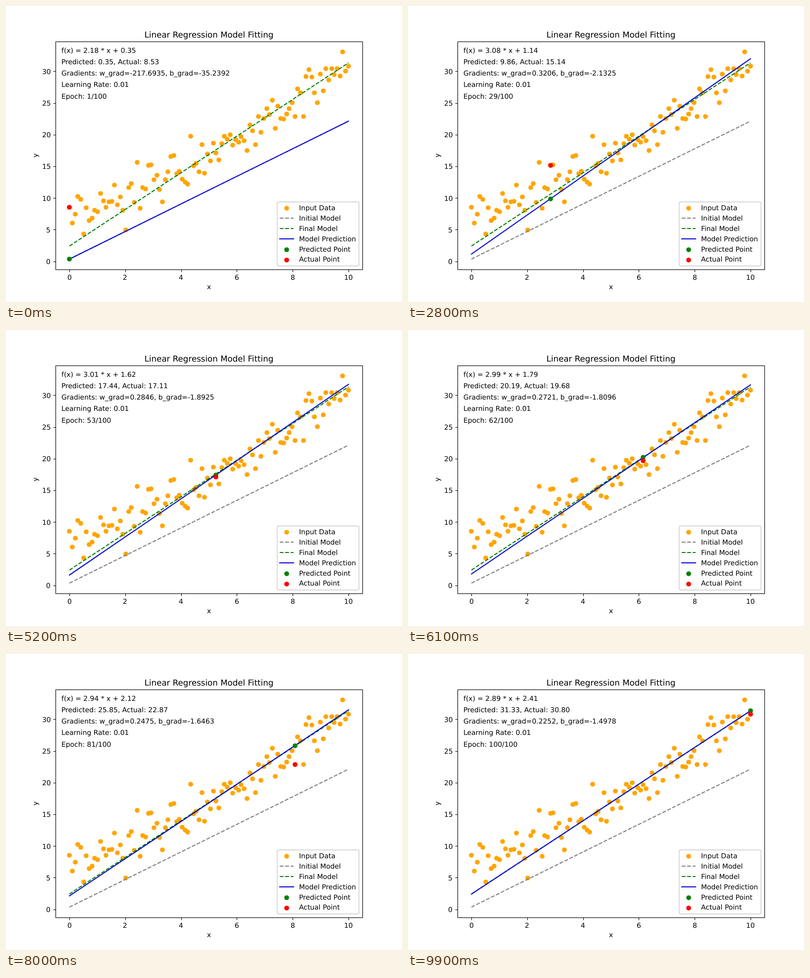
These frames come from a looping animation (800 px wide and 600 px high, 10000 ms). An HTML page:

```html
<!DOCTYPE html>
<html lang="en">
<head>
<meta charset="utf-8">
<title>Linear Regression Model Fitting</title>
<style>
  html, body { margin: 0; width: 100%; height: 100%; overflow: hidden; background: #fff; }
  svg { display: block; width: 800px; height: 600px; }
  text { font: 13.89px "DejaVu Sans", sans-serif; text-rendering: geometricPrecision; white-space: pre; }
  .title { font-size: 16.67px; }
  .mid { text-anchor: middle; }
</style>
</head>
<body>
<svg id="stage" viewBox="0 0 800 600" xmlns="http://www.w3.org/2000/svg"></svg>
<script>
const EPOCHS = 100, STEP_MS = 100, RATE = 0.01, DIGIT_WIDTH = 8.84;
const PLOT = { left: 100, top: 72, width: 620, height: 462 };
const COLORS = { data: '#ffa500', initial: '#808080', final: '#008000', model: '#0808d0', predicted: '#008000', actual: '#ff0000' };

// Mersenne Twister (MT19937), returning doubles in [0, 1).
function twister(seed) {
  const N = 624, state = new Uint32Array(N);
  state[0] = seed;
  for (let i = 1; i < N; i++) {
    state[i] = Math.imul(1812433253, state[i - 1] ^ (state[i - 1] >>> 30)) + i;
  }
  let index = N;
  function refill() {
    for (let i = 0; i < N; i++) {
      const y = (state[i] & 0x80000000) | (state[(i + 1) % N] & 0x7fffffff);
      state[i] = state[(i + 397) % N] ^ (y >>> 1) ^ (y & 1 ? 0x9908b0df : 0);
    }
    index = 0;
  }
  function nextInt() {
    if (index === N) refill();
    let y = state[index++];
    y ^= y >>> 11;
    y ^= (y << 7) & 0x9d2c5680;
    y ^= (y << 15) & 0xefc60000;
    y ^= y >>> 18;
    return y >>> 0;
  }
  return () => ((nextInt() >>> 5) * 67108864 + (nextInt() >>> 6)) / 9007199254740992;
}

// Normal deviates by the polar method; each round yields a pair.
function gaussian(random) {
  let spare = null;
  return () => {
    if (spare !== null) {
      const value = spare;
      spare = null;
      return value;
    }
    let u, v, r2;
    do {
      u = 2 * random() - 1;
      v = 2 * random() - 1;
      r2 = u * u + v * v;
    } while (r2 >= 1 || r2 === 0);
    const f = Math.sqrt(-2 * Math.log(r2) / r2);
    spare = f * u;
    return f * v;
  };
}

const noise = gaussian(twister(0));
const points = Array.from({ length: 100 }, (_, i) => {
  const x = 10 * i / 99;
  return { x, y: 2.5 * x + 5 + 2 * noise() };
});

// Gradient descent on the mean squared error.
const mean = f => points.reduce((sum, p) => sum + f(p), 0) / points.length;
const history = [];
for (let k = 0, w = 0, b = 0; k < EPOCHS; k++) {
  const error = p => w * p.x + b - p.y;
  const gw = 2 * mean(p => error(p) * p.x);
  const gb = 2 * mean(error);
  w -= RATE * gw;
  b -= RATE * gb;
  history.push({ w, b, gw, gb });
}

// The data range fills the plot except for a margin of 5% of the range per side.
const minY = history[0].b, maxY = Math.max(...points.map(p => p.y));
const px = x => PLOT.left + PLOT.width * (0.05 + x / 10) / 1.1;
const py = y => PLOT.top + PLOT.height * (1.05 - (y - minY) / (maxY - minY)) / 1.1;

const stage = document.getElementById('stage');
function add(tag, attrs, content = '') {
  const el = document.createElementNS(stage.namespaceURI, tag);
  for (const name in attrs) el.setAttribute(name, attrs[name]);
  el.textContent = content;
  return stage.appendChild(el);
}
const label = (x, y, content, cls = '') =>
  add('text', { x: Math.round(x), y: Math.round(y), class: cls }, content);
const line = (x1, y1, x2, y2, stroke, width = 1.11) =>
  add('line', { x1, y1, x2, y2, stroke, 'stroke-width': width });

function moveDot(el, x, y) {
  el.setAttribute('cx', Math.round(x));
  el.setAttribute('cy', Math.round(y));
}
function dot(x, y, fill) {
  const el = add('circle', { r: 4.86, fill });
  moveDot(el, x, y);
  return el;
}

function plotLine(x1, y1, x2, y2, color, dashed) {
  const el = line(x1, y1, x2, y2, color, 2.083);
  if (dashed) el.setAttribute('stroke-dasharray', '7.71 3.33');
  else el.setAttribute('stroke-linecap', 'square');
  return el;
}
const fitLine = ({ w, b }, color, dashed) =>
  plotLine(px(0), py(b), px(10), py(10 * w + b), color, dashed);

function drawAxes() {
  const snap = v => Math.round(v) + 0.5;
  const textWidth = n => DIGIT_WIDTH * String(n).length;
  add('rect', { x: 100.5, y: 72.5, width: PLOT.width, height: PLOT.height,
    fill: 'none', stroke: '#000', 'stroke-width': 1.11 });
  for (let x = 0; x <= 10; x += 2) {
    line(snap(px(x)), 534.5, snap(px(x)), 539.4, '#000');
    label(px(x) - textWidth(x) / 2, 555, x);
  }
  for (let y = 0; y <= 30; y += 5) {
    line(95.6, snap(py(y)), 100.5, snap(py(y)), '#000');
    label(90.28 - textWidth(y), py(y) + 5.5, y);
  }
  label(410, 574, 'x', 'mid');
  add('text', { transform: 'translate(63.5 303) rotate(-90)', class: 'mid' }, 'y');
  label(410, 64, 'Linear Regression Model Fitting', 'title mid');
}

function drawLegend() {
  add('rect', { x: 547.9, y: 397.2, width: 165.2, height: 129.8, rx: 2.78,
    fill: '#fff', 'fill-opacity': 0.8, stroke: '#ccc', 'stroke-width': 1.39 });
  const rows = [
    ['Input Data', 'data', 'dot'], ['Initial Model', 'initial', 'dashed'],
    ['Final Model', 'final', 'dashed'], ['Model Prediction', 'model', 'solid'],
    ['Predicted Point', 'predicted', 'dot'], ['Actual Point', 'actual', 'dot']
  ];
  rows.forEach(([name, key, kind], i) => {
    const base = 413.85 + 20.92 * i, middle = Math.round(base - 4.86);
    if (kind === 'dot') dot(567.3, base - 3.65, COLORS[key]);
    else plotLine(553, middle, 581, middle, COLORS[key], kind === 'dashed');
    label(592.3, base, name);
  });
}

points.forEach(p => dot(px(p.x), py(p.y), COLORS.data));
fitLine(history[0], COLORS.initial, true);
fitLine(history[EPOCHS - 1], COLORS.final, true);
const model = fitLine(history[0], COLORS.model, false);
const predicted = dot(0, 0, COLORS.predicted);
const actual = dot(0, 0, COLORS.actual);
drawAxes();
const info = Array.from({ length: 5 }, (_, i) => label(112.4, 95.1 + 23.1 * i, ''));
drawLegend();

function render(time) {
  const k = Math.floor(time / STEP_MS) % EPOCHS;
  const { w, b, gw, gb } = history[k];
  const { x, y } = points[k];
  const guess = w * x + b;
  model.setAttribute('y1', py(b));
  model.setAttribute('y2', py(10 * w + b));
  moveDot(predicted, px(x), py(guess));
  moveDot(actual, px(x), py(y));
  [
    `f(x) = ${w.toFixed(2)} * x + ${b.toFixed(2)}`,
    `Predicted: ${guess.toFixed(2)}, Actual: ${y.toFixed(2)}`,
    `Gradients: w_grad=${gw.toFixed(4)}, b_grad=${gb.toFixed(4)}`,
    `Learning Rate: ${RATE}`,
    `Epoch: ${k + 1}/${EPOCHS}`
  ].forEach((content, i) => { info[i].textContent = content; });
}

const start = performance.now();
function tick() {
  render(performance.now() - start);
  requestAnimationFrame(tick);
}
tick();
</script>
</body>
</html>
```
